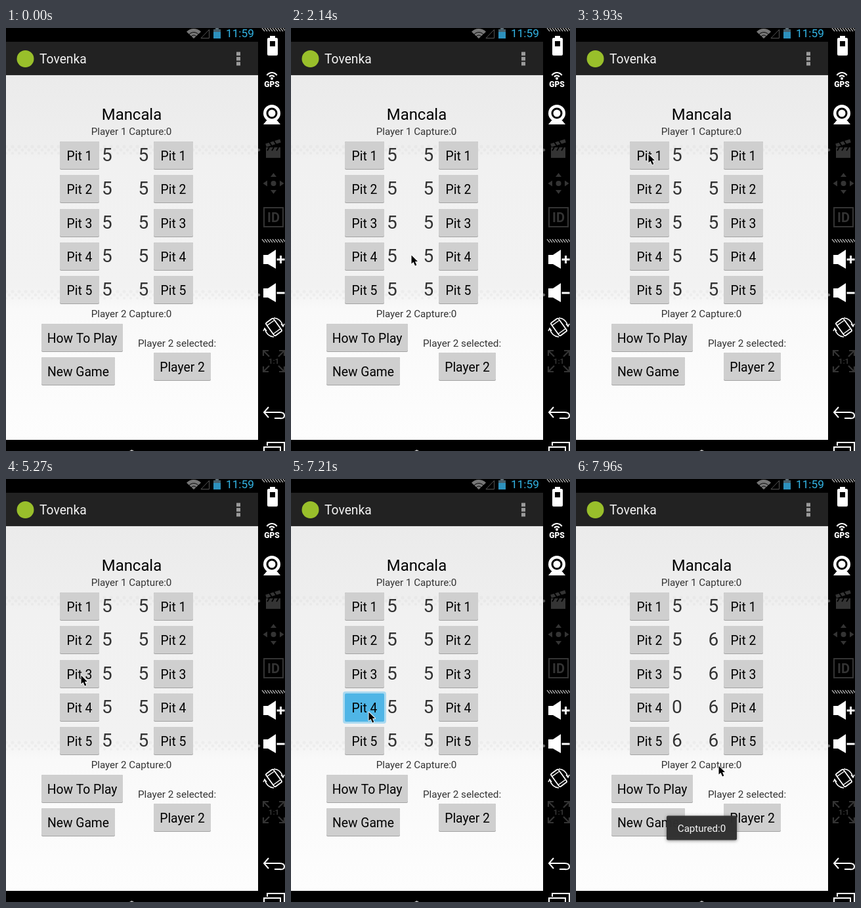
These frames come from a looping animation (425x645 px, 8000 ms). An HTML page with a canvas:

```html
<!DOCTYPE html>
<html lang="en">
<head>
<meta charset="utf-8">
<title>Mancala</title>
<style>
html, body { margin: 0; width: 100%; height: 100%; overflow: hidden; background: #000; }
canvas { display: block; }
</style>
</head>
<body>
<canvas id="stage" width="425" height="645"></canvas>
<script>
const ctx = document.getElementById('stage').getContext('2d');
const LOOP = 8000;
const FONT = 'Roboto, "Open Sans", sans-serif';
const ROW = 51.3;

// Pointer keys: time, x, y; x < 0 hides it
const POINTER = [
  [0, -1, 0], [500, 340, 639], [1100, -1, 0],
  [1840, 279, 607], [1990, 230, 470], [2140, 183, 346], [2290, 152, 288],
  [2435, 128, 246], [2580, 113, 220], [2730, 110, 210], [3030, 110, 190],
  [3780, 110, 191], [3930, 110, 192], [4380, 109, 197], [4530, 109, 210],
  [4680, 110, 228], [4820, 111, 247], [4970, 112, 266], [5120, 113, 284],
  [5270, 114, 299], [5420, 117, 335], [5570, 118, 356], [6610, 118, 355],
  [7660, 124, 362], [7810, 172, 402], [7960, 217, 437]
];
const TOAST = [[0, 0], [7360, 0.15], [7510, 0.55], [7660, 0.85], [7810, 0.96]];

function at(keys, t) {
  let k = keys[0];
  for (const next of keys) if (next[0] <= t) k = next;
  return k;
}

function rect(x, y, w, h, color) {
  ctx.fillStyle = color;
  ctx.fillRect(x, y, w, h);
}

function round(x, y, w, h, r, color) {
  ctx.beginPath();
  ctx.roundRect(x, y, w, h, r);
  ctx.fillStyle = color;
  ctx.fill();
}

function disc(x, y, r, color) {
  ctx.beginPath();
  ctx.arc(x, y, r, 0, 7);
  ctx.fillStyle = color;
  ctx.fill();
}

function poly(points, color) {
  ctx.beginPath();
  points.forEach(([x, y]) => ctx.lineTo(x, y));
  ctx.closePath();
  ctx.fillStyle = color;
  ctx.fill();
}

function path(d, color, width = 2) {
  ctx.strokeStyle = color;
  ctx.lineWidth = width;
  ctx.stroke(new Path2D(d));
}

function text(s, x, y, size, color = '#000', align = 'left', weight = 400) {
  ctx.font = `${weight} ${size}px ${FONT}`;
  ctx.textAlign = align;
  ctx.fillStyle = color;
  ctx.fillText(s, x, y);
}

function button(label, x, y, w, pressed) {
  if (pressed) {
    round(x - 3, y - 3, w + 6, 49, 4, '#a9d9f0');
    round(x, y, w, 43, 2, '#4fb5e6');
  } else {
    round(x, y, w, 43, 2, '#a2a2a2');
    round(x, y, w, 42, 2, '#cfcfcf');
  }
  text(label, x + w / 2, y + 28.5, 19.3, '#000', 'center');
}

function dotBand(y, color) {
  for (let row = 0; row < 3; row++)
    for (let x = row % 2 * 5; x < 388; x += 10)
      disc(x, y + row * 5, 2.6 - row * 0.3, color);
}

function background() {
  const g = ctx.createLinearGradient(0, 72, 0, 628);
  g.addColorStop(0, '#ebebeb');
  g.addColorStop(0.19, '#eeeeee');
  g.addColorStop(0.23, '#f1f1f1');
  g.addColorStop(0.58, '#f2f2f2');
  g.addColorStop(0.64, '#f9f9f9');
  g.addColorStop(1, '#fdfdfd');
  rect(0, 72, 384, 556, g);
  dotBand(181, 'rgba(222,222,222,.35)');
  dotBand(402, 'rgba(228,228,228,.45)');
}

function statusBar() {
  const wifi = '#777';
  ctx.beginPath();
  ctx.moveTo(286, 16);
  ctx.arc(286, 16, 15, -Math.PI * 0.76, -Math.PI * 0.24);
  ctx.fillStyle = wifi;
  ctx.fill();
  for (const r of [5, 9.5]) {
    ctx.beginPath();
    ctx.arc(286, 16, r, -Math.PI * 0.8, -Math.PI * 0.2);
    ctx.strokeStyle = '#000';
    ctx.lineWidth = 1;
    ctx.stroke();
  }
  path('M297 15.5L309.5 2.5V15.5Z', '#555', 1);
  rect(319, 0, 5, 2, '#5d6b72');
  rect(316, 2, 11, 14, '#48606c');
  rect(316, 6, 11, 10, '#2d91bd');
  text('11:59', 335, 14, 17.2, '#33b5e5');
}

function actionBar() {
  rect(0, 21, 384, 51, '#222');
  rect(0, 71, 384, 1, '#303030');
  disc(29.5, 47, 13, '#99bf2b');
  text('Tovenka', 51, 54, 19.3, '#f3f3f3');
  for (let i = 0; i < 3; i++) rect(351, 36.5 + i * 7.6, 6, 5.6, '#9b9b9b');
}

function hatch(y) {
  for (let x = 390; x < 425; x += 4) path(`M${x} ${y}l4 5`, '#aaa', 1.3);
}

function speaker(y, plus) {
  poly([[392, y - 7], [399, y - 7], [411, y - 15], [411, y + 14], [399, y + 7], [392, y + 7]], '#fff');
  rect(412.5, y - 1.5, 12, 3, '#fff');
  if (plus) rect(417, y - 6, 3, 12, '#fff');
}

function sidebar() {
  const dim = '#343434', white = '#fff';
  hatch(0);
  rect(402, 12, 8, 4, white);
  round(398, 15, 16, 27, 2, white);
  rect(402, 20, 8, 8, '#000');

  for (const r of [4.5, 9]) {
    ctx.beginPath();
    ctx.arc(405, 77, r, -Math.PI * 0.82, -Math.PI * 0.18);
    ctx.strokeStyle = white;
    ctx.lineWidth = 2.2;
    ctx.stroke();
  }
  disc(405, 77, 2, white);
  text('GPS', 405, 90, 12, white, 'center', 900);

  disc(405, 130, 13, white);
  disc(405, 130, 8.5, '#000');
  disc(405, 130, 5.5, white);
  poly([[397, 141], [413, 141], [418, 147], [392, 147]], white);

  rect(396, 182, 22, 16, dim);
  path('M396 179L418 172', dim, 5);
  path('M401 174l4 6M408 172l4 6M401 182l-3 5M408 182l-3 5M415 182l-3 5', '#000', 1.8);

  disc(407.5, 237, 4, dim);
  poly([[407.5, 221], [412, 227], [403, 227]], dim);
  poly([[407.5, 253], [412, 247], [403, 247]], dim);
  poly([[391.5, 237], [398, 232.5], [398, 241.5]], dim);
  poly([[423.5, 237], [417, 232.5], [417, 241.5]], dim);

  path('M393 274H422V303H393Z', dim, 2);
  text('ID', 407.5, 296, 20, dim, 'center', 700);

  hatch(322);
  speaker(353, true);
  speaker(404, false);

  ctx.save();
  ctx.translate(408, 456);
  ctx.rotate(-Math.PI / 5);
  ctx.beginPath();
  ctx.roundRect(-7, -12, 14, 24, 2);
  ctx.strokeStyle = white;
  ctx.lineWidth = 1.8;
  ctx.stroke();
  path('M-7 -8H7M-7 8H7', white, 1.3);
  ctx.restore();
  path('M408 442Q419 443 422 455M419 451l3 4 2-4M408 471Q397 470 394 458M397 462l-3-4-2 4', white, 1.5);

  for (const sx of [-1, 1]) for (const sy of [-1, 1]) {
    const x = 408 + sx * 16, y = 508 + sy * 16;
    path(`M${x - sx * 8} ${y}H${x}V${y - sy * 8}M${x} ${y}l${-sx * 9} ${-sy * 9}`, dim, 2.2);
  }
  text('1:1', 408, 512, 11.5, dim, 'center', 700);

  path('M400 578L393 586L400 594M393 586H417Q424 586 424 591T417 595H409', white, 2);
  path('M398 637V632H424V645M393 645V639H418V645', white, 2);
}

function pointer(x, y) {
  ctx.save();
  ctx.translate(x, y);
  const arrow = new Path2D('M.5 .5V13.5L3.5 10.8L6 16.5L8.3 15.5L6 10H10Z');
  ctx.lineJoin = 'round';
  ctx.strokeStyle = '#fff';
  ctx.lineWidth = 1.8;
  ctx.stroke(arrow);
  ctx.fillStyle = '#000';
  ctx.fill(arrow);
  ctx.restore();
}

function toast(alpha) {
  if (!alpha) return;
  ctx.save();
  ctx.globalAlpha = alpha;
  ctx.shadowColor = 'rgba(0,0,0,.5)';
  ctx.shadowBlur = 5;
  ctx.shadowOffsetY = 1;
  round(138, 513.5, 107, 37, 2, '#303030');
  ctx.shadowColor = 'transparent';
  text('Captured:0', 191.5, 538, 15.1, '#fff', 'center');
  ctx.restore();
}

function board(t) {
  const played = t >= 7360;
  const pressed = t >= 7210 && !played;
  const left = played ? [5, 5, 5, 0, 6] : [5, 5, 5, 5, 5];
  const right = played ? [5, 6, 6, 6, 6] : [5, 5, 5, 5, 5];
  text('Mancala', 191.5, 140, 23.9, '#000', 'center');
  text('Player 1 Capture:0', 191, 163, 15.15, '#333', 'center');
  for (let i = 0; i < 5; i++) {
    const y = 173 + i * ROW, top = Math.round(y);
    button('Pit ' + (i + 1), 82, top, 60, pressed && i === 3);
    button('Pit ' + (i + 1), 225, top, 60);
    text(left[i], 146, top + 29.5, 28, '#333');
    text(right[i], 201.5, top + 29.5, 28, '#333');
  }
  text('Player 2 Capture:0', 191, 441, 15.15, '#333', 'center');
  button('How To Play', 54, 451, 124);
  button('New Game', 54, 502, 112);
  text('Player 2 selected:', 201, 486, 15.25, '#333');
  button('Player 2', 225, 495, 87);
}

function draw(t) {
  rect(0, 0, 425, 645, '#000');
  background();
  statusBar();
  actionBar();
  board(t);
  poly([[191.5, 643], [195, 645], [188, 645]], '#bbb');
  sidebar();
  toast(at(TOAST, t)[1]);
  const [, x, y] = at(POINTER, t);
  if (x >= 0) pointer(x, y);
}

const start = performance.now();
function frame() {
  draw((performance.now() - start) % LOOP);
  requestAnimationFrame(frame);
}
frame();
</script>
</body>
</html>
```
